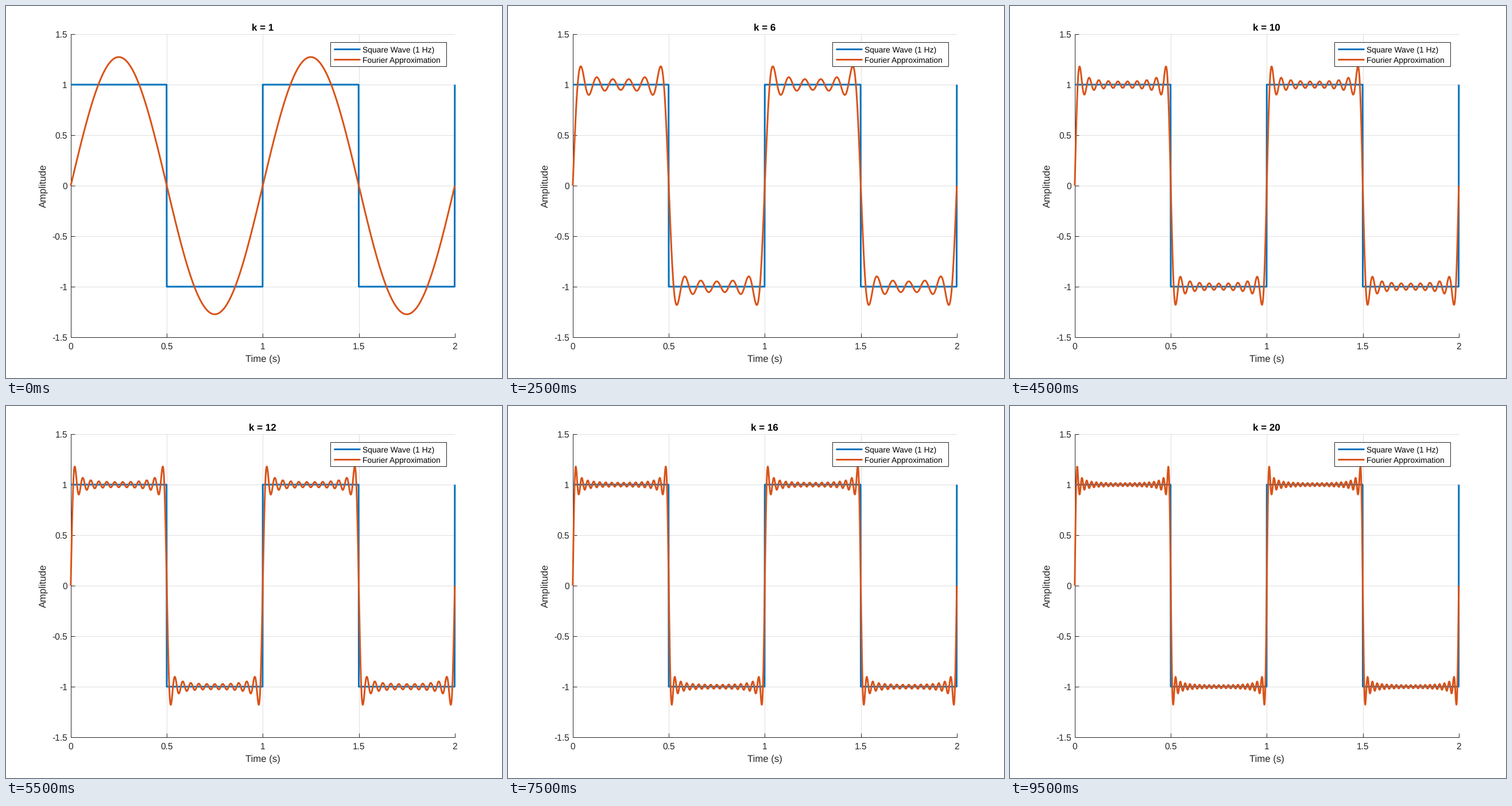
A matplotlib script that plays this animation: 864 px wide and 648 px high, repeating every 10000 ms.

```python
import matplotlib.pyplot as plt
import numpy as np
from matplotlib.animation import FuncAnimation
from matplotlib.lines import Line2D
from matplotlib.patches import Rectangle
from matplotlib.transforms import Affine2D

WIDTH, HEIGHT, DPI = 864, 648, 72
LEFT, RIGHT, TOP, BOTTOM = 112.8, 781.8, 49, 576.9
HARMONICS = 20
BLUE, ORANGE, DARK = "#0072BD", "#D95319", "#262626"

plt.rcParams.update({
    "font.family": "Liberation Sans",
    "text.hinting": "no_hinting",
    "path.simplify": False,
    "toolbar": "None",
})

fig = plt.figure(figsize=(WIDTH / DPI, HEIGHT / DPI), dpi=DPI, facecolor="white")
# Stage pixels, measured from the top left corner
pixels = Affine2D().scale(1 / WIDTH, -1 / HEIGHT).translate(0, 1) + fig.transFigure


def label(x, y, text, size, ha="center", color=DARK, **style):
    return fig.text(x, y, text, transform=pixels, fontsize=size, ha=ha,
                    va="baseline", color=color, **style)


ax = fig.add_axes([LEFT / WIDTH, 1 - BOTTOM / HEIGHT,
                   (RIGHT - LEFT) / WIDTH, (BOTTOM - TOP) / HEIGHT])
ax.set(xlim=(0, 2), ylim=(-1.5, 1.5),
       xticks=np.linspace(0, 2, 5), yticks=np.linspace(-1.5, 1.5, 7))
ax.set_axisbelow(True)
ax.grid(color="#dfdfdf", linewidth=1)
ax.tick_params(direction="in", length=6.7, width=1, color=DARK,
               labelbottom=False, labelleft=False)
for side, spine in ax.spines.items():
    spine.set(visible=side in ("left", "bottom"), color=DARK, linewidth=1, zorder=1)

for value in ax.get_xticks():
    label(LEFT + value / 2 * (RIGHT - LEFT), 598, f"{value:g}", 15.5)
for value in ax.get_yticks():
    y = BOTTOM - (value + 1.5) / 3 * (BOTTOM - TOP)
    label(106.9, y + 5.6, f"{value:g}", 15.5, ha="right")

label(447, 619, "Time (s)", 16.8)
label(69.5, 313, "Amplitude", 17, rotation=90, rotation_mode="anchor")
title = label(447, 43, "", 17, color="black", weight="bold")

step = np.arange(2001)
time = step / 1000
square = np.where(step % 1000 < 500, 1, -1)
stroke = dict(linewidth=3, solid_capstyle="butt", solid_joinstyle="round")
ax.plot(time, square, color=BLUE, clip_on=False, zorder=3, **stroke)
approximation, = ax.plot([], [], color=ORANGE, clip_on=False, zorder=4, **stroke)

# Whole-number edges here snap to the centres of their pixels
fig.add_artist(Rectangle((565, 63), 202, 42, transform=pixels,
                         facecolor="white", edgecolor=DARK, linewidth=1))
for y, color, name in ((75, BLUE, "Square Wave (1 Hz)"),
                       (93, ORANGE, "Fourier Approximation")):
    fig.add_artist(Line2D([571, 617], [y, y], transform=pixels, color=color, **stroke))
    label(621.3, y + 5.8, name, 13.9, ha="left", color="black")


def update(frame):
    k = frame + 1
    odd = 2 * np.arange(k)[:, None] + 1
    series = 4 / np.pi * (np.sin(2 * np.pi * odd * time) / odd).sum(axis=0)
    approximation.set_data(time, series)
    title.set_text(f"k = {k}")
    return approximation, title


animation = FuncAnimation(fig, update, frames=HARMONICS, interval=500,
                          repeat=True, repeat_delay=0)
plt.show()
```
